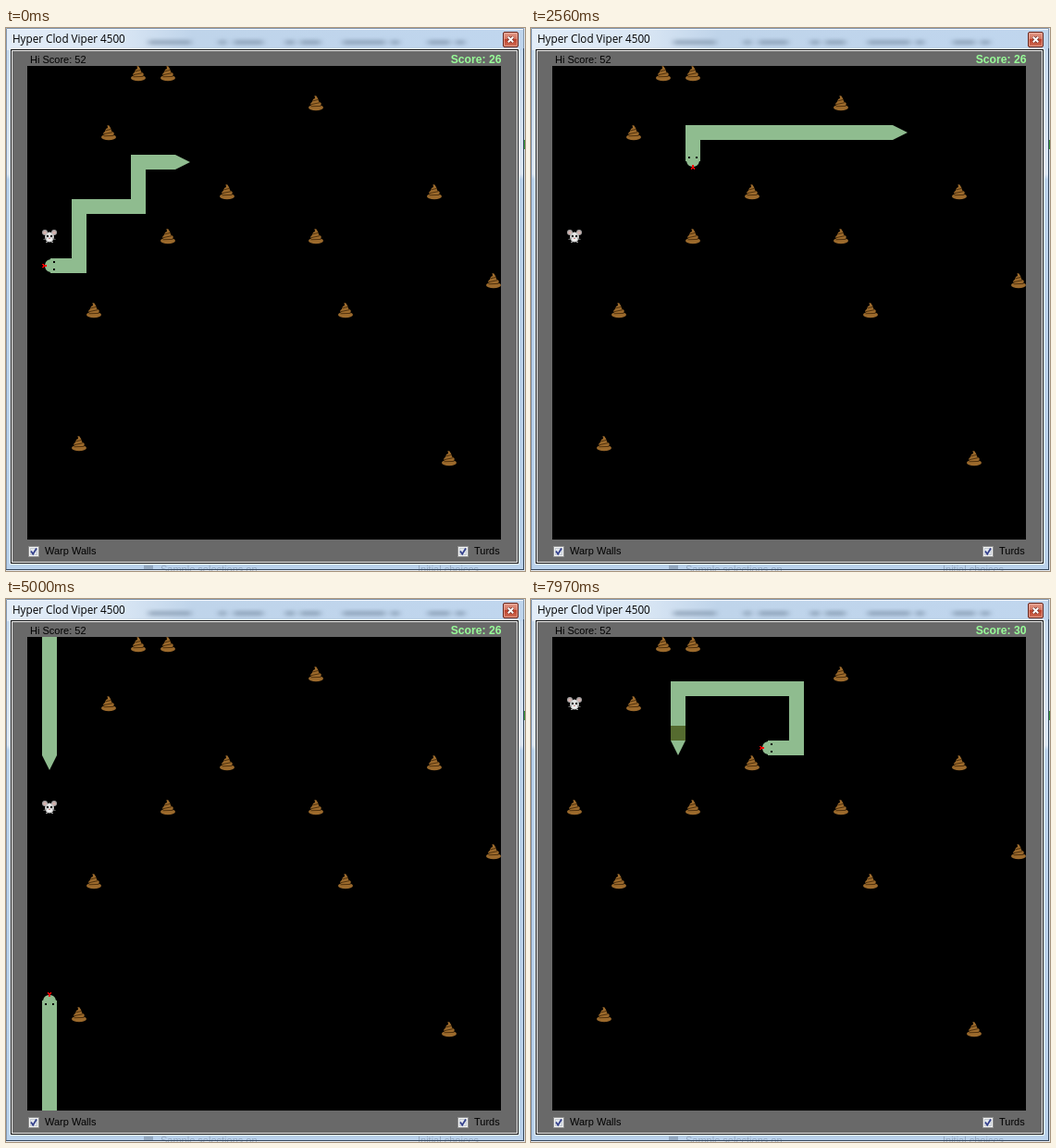
Recreate the animation shown at these times as an HTML page with a canvas. Size 561 px wide and 587 px high, loop 8 s.

```html
<!DOCTYPE html>
<html lang="en">
<head>
<meta charset="utf-8">
<title>Snake game</title>
<style>
  html, body { margin: 0; width: 100%; height: 100%; overflow: hidden; background: #fff; }
  svg { position: absolute; left: 0; top: 0; display: block; }
  canvas { position: absolute; left: 23px; top: 41px; display: block; }
  text { font: 11px "Liberation Sans", Arial, sans-serif; white-space: pre; }
  .title { font: 11.7px "Open Sans", "Noto Sans", sans-serif; }
  #score { font-weight: bold; font-size: 12.2px; fill: #98fb98; }
</style>
</head>
<body>
<svg width="561" height="587" viewBox="0 0 561 587">
  <defs>
    <linearGradient id="bar">
      <stop offset="0" stop-color="#e3edf8"/>
      <stop offset=".22" stop-color="#d9e6f4"/>
      <stop offset=".36" stop-color="#bfd4ea"/>
      <stop offset="1" stop-color="#c0d6ee"/>
    </linearGradient>
    <linearGradient id="side" x2="0" y2="1">
      <stop offset="0" stop-color="#c4d8ee"/>
      <stop offset=".27" stop-color="#dfe9f5"/>
      <stop offset=".28" stop-color="#bcd3ec"/>
      <stop offset="1" stop-color="#bad2ec"/>
    </linearGradient>
    <linearGradient id="red" x2="0" y2="1">
      <stop offset="0" stop-color="#e5a08f"/>
      <stop offset=".48" stop-color="#d2705b"/>
      <stop offset=".5" stop-color="#bd402a"/>
      <stop offset="1" stop-color="#d2725a"/>
    </linearGradient>
    <filter id="soft" x="-20%" y="-100%" width="140%" height="300%"><feGaussianBlur stdDeviation="3 2"/></filter>
    <g id="check">
      <rect x=".5" y=".5" width="11" height="11" fill="#f4f4f4" stroke="#8e8f8f"/>
      <rect x="2.5" y="2.5" width="7" height="7" fill="#e3e7ec" stroke="#c3c9d0"/>
      <path d="M3 5.5 5.2 8.7 9 2.6" fill="none" stroke="#35418c" stroke-width="1.8"/>
    </g>
  </defs>

  <rect width="561" height="587" fill="#e9eef4"/>
  <rect width="560" height="585" fill="url(#side)"/>
  <rect width="560" height="24" fill="url(#bar)"/>
  <g filter="url(#soft)" fill="#71859c" opacity=".6">
    <rect x="154" y="13" width="46" height="5"/>
    <rect x="230" y="13" width="8" height="5"/>
    <rect x="246" y="13" width="32" height="5"/>
    <rect x="302" y="13" width="10" height="5"/>
    <rect x="318" y="13" width="22" height="5"/>
    <rect x="364" y="13" width="46" height="5"/>
    <rect x="416" y="13" width="9" height="5"/>
    <rect x="456" y="13" width="24" height="5"/>
    <rect x="486" y="13" width="10" height="5"/>
  </g>
  <g opacity=".35" fill="#4c5c70">
    <text x="167" y="589">Sample selections on</text>
    <text x="445" y="589">Initial choices</text>
    <rect x="149" y="581" width="10" height="4"/>
  </g>
  <path d="M.5 585V.5H559.5V585" fill="none" stroke="#8297b0"/>
  <path d="M1 1.5H559" stroke="#f4f9ff"/>
  <path d="M0 585.5H560M559.5 22V585" stroke="#34475e"/>
  <path d="M560.5 0V587" stroke="#dfe5ec"/>
  <path d="M560.5 121V131" stroke="#3a9a3a"/>

  <text class="title" x="7" y="16">Hyper Clod Viper 4500</text>
  <rect x="537.5" y="4.5" width="16" height="16" rx="1.5" fill="url(#red)" stroke="#67251c"/>
  <rect x="538.5" y="5.5" width="14" height="14" rx="1" fill="none" stroke="#f0b7a8" opacity=".7"/>
  <path d="M542.8 9.8l5.4 5.4m0-5.4l-5.4 5.4" stroke="#6d302a" stroke-width="3.4"/>
  <path d="M542.8 9.8l5.4 5.4m0-5.4l-5.4 5.4" stroke="#fff" stroke-width="2"/>

  <rect x="4" y="22" width="551" height="558" fill="#e8f1fb"/>
  <rect x="5" y="23" width="549" height="556" fill="#111"/>
  <rect x="6" y="24" width="547" height="554" fill="#f4f4f4"/>
  <rect x="7" y="25" width="545" height="552" fill="#696969"/>
  <text x="26" y="38">Hi Score: 52</text>
  <text id="score" x="535.5" y="38" text-anchor="end">Score: 26</text>
  <use href="#check" x="24" y="560"/>
  <text x="42" y="569">Warp Walls</text>
  <use href="#check" x="488" y="560"/>
  <text x="506" y="569">Turds</text>
</svg>
<canvas id="board" width="512" height="512"></canvas>

<script>
const LOOP = 8000, CELL = 16, SIZE = 32, LENGTH = 17;
const ctx = document.getElementById('board').getContext('2d');
const score = document.getElementById('score');

// The whole route, beginning at the first tail cell.
const STEP = { L: [-1, 0], R: [1, 0], U: [0, -1], D: [0, 1] };
const route = [[10, 6]];
for (const run of 'L3 D3 L4 D4 L5 U9 L21 D6 L8 U34 R7 U5 R8 D4 L2'.split(' ')) {
  const [dx, dy] = STEP[run[0]];
  for (let i = +run.slice(1); i > 0; i--) {
    const [x, y] = route[route.length - 1];
    route.push([(x + dx + SIZE) % SIZE, (y + dy + SIZE) % SIZE]);
  }
}

// Pace: time, moves made by then, screen updates since the row above.
const pace = [
  [0, 0, 1], [120, 2, 1], [1050, 14, 7], [1180, 16, 1], [1860, 25, 5],
  [2020, 27, 1], [2160, 29, 1], [2280, 31, 1], [3250, 44, 7], [3410, 46, 1],
  [4220, 56, 6], [4340, 58, 1], [4460, 60, 1], [5410, 72, 7], [5550, 74, 1],
  [5670, 76, 1], [5820, 78, 1], [6490, 86, 5], [6630, 88, 1], [7020, 94, 3],
  [7160, 96, 1], [7520, 100, 3], [7680, 102, 1], [7970, 107, 2]
];
const updates = [[0, 0]];
for (let i = 1; i < pace.length; i++) {
  const [t0, m0] = pace[i - 1], [t1, m1, n] = pace[i];
  for (let k = 1; k <= n; k++)
    updates.push([t0 + (t1 - t0) * k / n, Math.round(m0 + (m1 - m0) * k / n)]);
}

const meals = [78, 90];
const mice = [...meals.map(m => route[m + LENGTH - 1]), [1, 4]];
const turds = [[7, 0], [9, 0], [19, 2], [5, 4], [13, 8], [27, 8], [9, 11],
  [19, 11], [31, 14], [4, 16], [21, 16], [3, 25], [28, 26]];

function inCell([x, y], draw, angle = 0) {
  ctx.save();
  ctx.translate(x * CELL + 8, y * CELL + 8);
  ctx.rotate(angle);
  ctx.translate(-8, -8);
  draw();
  ctx.restore();
}

function box(color, x, y, w, h) {
  ctx.fillStyle = color;
  ctx.fillRect(x, y, w, h);
}

function shape(color, ...points) {
  ctx.fillStyle = color;
  ctx.beginPath();
  points.forEach(([x, y]) => ctx.lineTo(x, y));
  ctx.fill();
}

function oval(color, x, y, rx, ry) {
  ctx.fillStyle = color;
  ctx.beginPath();
  ctx.ellipse(x, y, rx, ry, 0, 0, 7);
  ctx.fill();
}

function line(color, x1, y1, x2, y2) {
  ctx.strokeStyle = color;
  ctx.beginPath();
  ctx.moveTo(x1, y1);
  ctx.lineTo(x2, y2);
  ctx.stroke();
}

function turd() {
  const brown = '#9c6a2c', dark = '#50310d';
  oval(brown, 8, 13, 8, 3.2);
  oval(brown, 8, 9, 5.8, 3);
  shape(brown, [6.5, 0], [8.5, .5], [10, 3], [11.3, 7], [4, 7], [5, 4], [7, 3]);
  line(dark, 5, 5.8, 10.5, 4.4);
  line(dark, 3, 9.6, 12.5, 7.6);
  line(dark, 2.5, 11.8, 13.5, 11.4);
}

function mouse() {
  for (const x of [3, 13]) {
    oval('#a9a5a5', x, 4, 3, 3);
    oval('#d6b4b0', x, 4.2, 1.7, 1.7);
  }
  oval('#c9c9c9', 8, 9, 5, 5.6);
  oval('#e4e4e4', 8, 6.5, 2, 2.5);
  box('#222', 5, 7, 2, 2);
  box('#222', 9, 7, 2, 2);
  oval('#efefef', 8, 11.5, 3, 2);
  box('#c98b8b', 7, 10, 2, 1);
  line('#777', 1.5, 11.5, 4.5, 11);
  line('#777', 11.5, 11, 14.5, 11.5);
  box('#999', 4, 14, 2, 1);
  box('#999', 10, 14, 2, 1);
}

const GREEN = '#8fbc8f';

function head() {
  shape(GREEN, [16, 0], [9, 0], [9, 1], [6, 2], [4, 4], [3, 7], [3, 9], [4, 12],
    [6, 14], [9, 15], [9, 16], [16, 16]);
  box('#000', 12, 3, 2, 2);
  box('#000', 12, 11, 2, 2);
  box('#f00', 2, 7, 3, 2);
  box('#f00', 0, 6, 2, 1);
  box('#f00', 0, 9, 2, 1);
  box('#f00', 1, 7, 1, 2);
}

const tail = () => shape(GREEN, [16, 0], [0, 8], [16, 16]);

// Angle that turns a left-facing part to look from one cell to its neighbour.
function heading(from, to) {
  const near = d => Math.abs(d) > 1 ? -Math.sign(d) : d;
  const dx = near(to[0] - from[0]), dy = near(to[1] - from[1]);
  return Math.atan2(dy, dx) - Math.PI;
}

function render(moves) {
  const eaten = meals.filter(m => moves >= m).length;
  const first = moves + LENGTH - 1, last = moves - eaten;
  const bulges = meals.map(m => m + LENGTH - 1);

  score.textContent = 'Score: ' + (26 + eaten * 2);
  box('#000', 0, 0, 512, 512);
  ctx.lineWidth = 1;
  turds.forEach(cell => inCell(cell, turd));
  bulges.filter(i => last > i).forEach(i => inCell(route[i], turd));
  inCell(mice[eaten], mouse);

  for (let i = last + 1; i < first; i++) {
    const [x, y] = route[i];
    box(bulges.includes(i) ? '#556b2f' : GREEN, x * CELL, y * CELL, CELL, CELL);
  }
  inCell(route[last], tail, heading(route[last + 1], route[last]));
  inCell(route[first], head, heading(route[first - 1], route[first]));
}

let shown = -1;
function frame() {
  const t = performance.now() % LOOP;
  let moves = 0;
  for (const [time, count] of updates) if (t >= time) moves = count;
  if (moves !== shown) render(shown = moves);
  requestAnimationFrame(frame);
}
frame();
</script>
</body>
</html>
```
